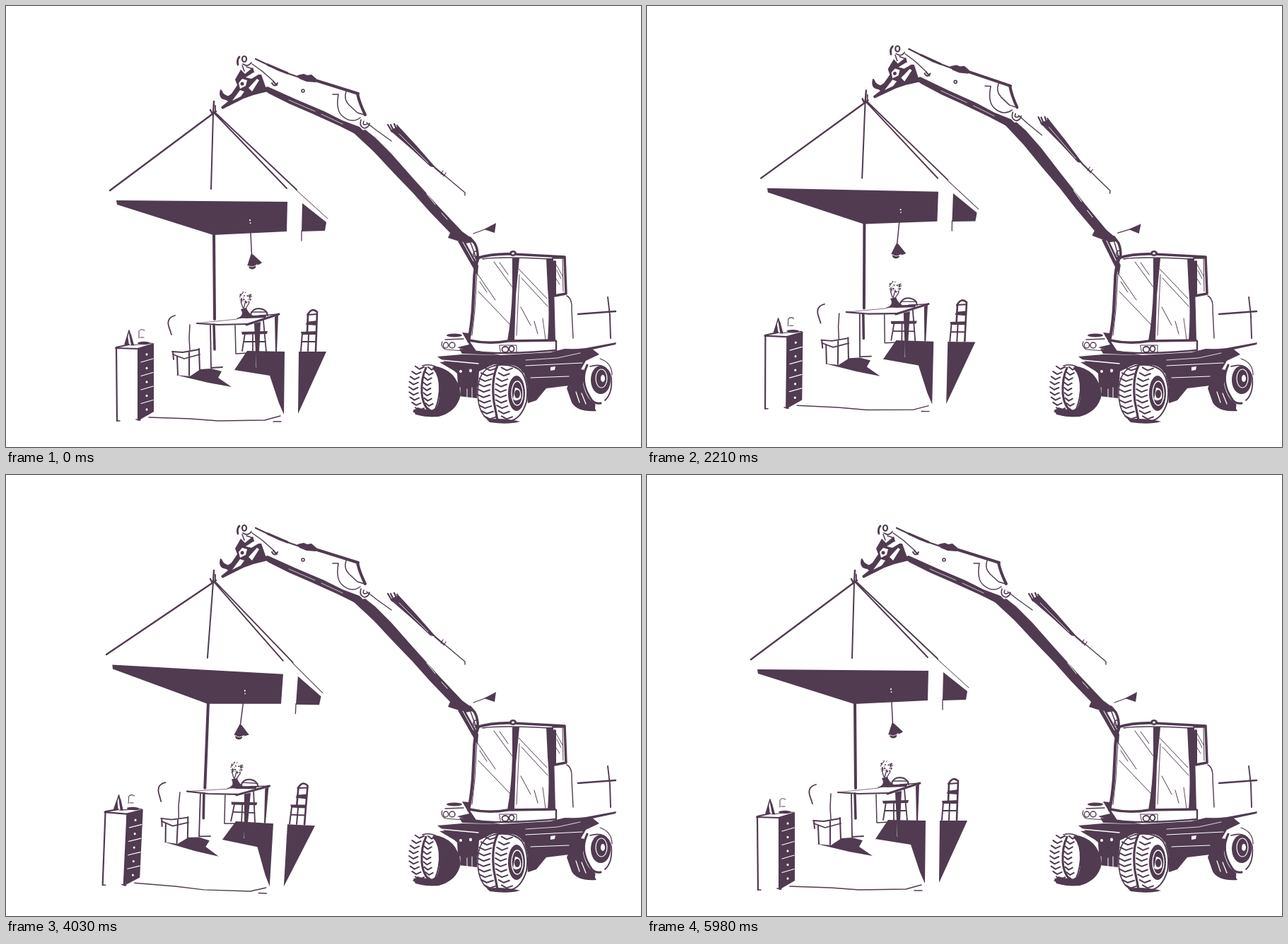
Write an HTML page with a canvas that moves like this. It is 898 px wide and 624 px high and loops after 6.11 s.

```html
<!DOCTYPE html>
<html lang="en">
<head>
<meta charset="utf-8">
<title>Crane lifting a room</title>
<style>
html, body { margin: 0; width: 100%; height: 100%; overflow: hidden; background: #fff; }
canvas { display: block; }
</style>
</head>
<body>
<canvas id="stage" width="898" height="624"></canvas>
<script>
const ctx = document.getElementById('stage').getContext('2d');
const INK = '#503b50', PAPER = '#fff';
const LOOP = 6110, STEP = 130;

// Pose keys: [time, value]
const LIFT = [[0, 0], [390, .5], [750, 1], [1350, .78], [1500, .76], [2600, .76], [2990, .3],
  [3250, -.33], [3450, -.5], [3900, -.2], [4030, 0], [LOOP, 0]];
const SWAY = [[0, 0], [300, .025], [600, .039], [780, .033], [1300, -.03], [1980, .025], [2210, .0125],
  [2600, -.006], [2990, .003], [3300, -.045], [3900, .027], [4030, .047], [4100, .05], [4450, .01],
  [4800, -.027], [5500, .013], [5850, 0], [LOOP, 0]];
const LAMP = [[0, -.05], [400, .13], [780, .09], [1200, -.1], [1600, .09], [1900, 0], [2210, .1],
  [2600, -.03], [2990, -.09], [3300, -.11], [3600, -.04], [4030, .13], [4680, 0], [4950, -.06],
  [5400, .04], [5850, -.03], [5980, -.05], [LOOP, -.05]];

// Smooth curve through the keys that rests at each extreme
function sample(keys, t) {
  const grade = i => (keys[i + 1][1] - keys[i][1]) / (keys[i + 1][0] - keys[i][0]);
  const slope = i => {
    if (i === 0 || i === keys.length - 1) return 0;
    const a = grade(i - 1), b = grade(i);
    return a * b <= 0 ? 0 : 2 * a * b / (a + b);
  };
  let i = 0;
  while (i < keys.length - 2 && t >= keys[i + 1][0]) i++;
  const [t0, v0] = keys[i], [t1, v1] = keys[i + 1], d = t1 - t0, s = (t - t0) / d;
  return v0 + (v1 - v0) * s * s * (3 - 2 * s)
    + d * s * (1 - s) * ((1 - s) * slope(i) - s * slope(i + 1));
}

function fill(d, color = INK) {
  ctx.fillStyle = color;
  ctx.fill(new Path2D(d));
}
function line(d, width = 2, color = INK) {
  ctx.strokeStyle = color;
  ctx.lineWidth = width;
  ctx.stroke(new Path2D(d));
}
function oval(x, y, rx, ry, color = INK, tilt = 0) {
  ctx.fillStyle = color;
  ctx.beginPath();
  ctx.ellipse(x, y, rx, ry, tilt, 0, 7);
  ctx.fill();
}
function ring(x, y, rx, ry, width = 2, color = INK) {
  ctx.strokeStyle = color;
  ctx.lineWidth = width;
  ctx.beginPath();
  ctx.ellipse(x, y, rx, ry, 0, 0, 7);
  ctx.stroke();
}
function turn(angle, x, y) {
  ctx.translate(x, y);
  ctx.rotate(angle);
  ctx.translate(-x, -y);
}
function group(draw) {
  ctx.save();
  draw();
  ctx.restore();
}
function spin([x, y], angle, [px, py]) {
  const c = Math.cos(angle), s = Math.sin(angle), dx = x - px, dy = y - py;
  return [px + dx * c - dy * s, py + dx * s + dy * c];
}
function random(seed) {
  return () => (seed = seed * 16807 % 2147483647) / 2147483647;
}

function drawBoom() {
  fill('M491 179L508 175L522 186L545 209L575 243L612 284L645 319L656 327L661 334L650 336L625 328L628 321L600 292L575 264L548 236L520 206Z');
  line('M595 266L607 281M616 293L624 302', 1, PAPER);
  line('M510 165L524 176L545 191', 1.3);
  fill('M639 333L648 331L668 367L667 381L662 373Z');
  line('M646 334L661 361', 1, PAPER);
  line('M656 328L663 336Q668 346 667 357', 3.5);
  line('M657 335L665 357', 1.5);
  ring(664, 351, 3, 4, 1.5);
  line('M661 322L680 315', 1.3);
  fill('M676 316L693 307L691 321Z');
}

function drawRam() {
  fill('M543 176L555 170L580 197L608 229L600 227L574 203Z');
  line('M540 168L546 178M544 168L549 178M549 167L553 176M553 169L557 176', 2.2);
  line('M556 181L597 222', .8, PAPER);
  line('M604 226L624 243L649 264V268', 1.4);
  line('M606 229L619 240M615 238L618 233M619 241L622 236', 1.2);
}

function drawStick() {
  line('M330 72Q326 76 328 83', 2.8);
  ring(337, 75, 3, 4, 2.2);
  line('M335 82Q342 87 347 80M334 84L337 92M340 86L349 89', 1.6);
  line('M353 75L370 83L386 91L415 101', 2.2);
  line('M370 83L398 95', 3);
  fill('M412 98L421 96L426 98L432 97L439 103L438 108L425 107L415 103Z');
  line('M434 104L466 114L498 124', 4);
  line('M348 82L362 92L379 107', 1.4);
  line('M376 109Q380 116 384 109M378 107L383 112', 2);
  ring(420, 120, 2, 2, 1.6);
  fill('M362 117L370 114L410 132L450 149L476 162L500 171L509 180L494 181L470 169L430 151L400 138L372 124Z');
  line('M400 133L437 149M446 153L476 167', .7, PAPER);
  line('M462 125H470Q466 148 476 156Q489 167 501 158', 1.5);
  line('M481 121Q477 132 485 140L497 151L507 154', 1.5);
  line('M497 124Q500 138 508 154', 4);
  line('M502 161Q499 171 507 173Q513 172 514 166M506 163Q503 170 511 167', 1.6);

  fill('M324 104L332 90L338 96L349 87L352 97L361 97L367 114L370 121L350 126L336 131L318 140L306 146L304 143L314 135L309 131L319 124L327 112Z');
  fill('M303 118Q299 133 313 133L322 127Q309 130 305 119Z');
  fill('M329 109L334 103L341 105L339 113L331 117Z', PAPER);
  oval(334, 110, 2.5, 2.5);
  fill('M339 101L350 94L357 97L347 103Z', PAPER);
  fill('M320 134L331 119L337 121L332 128Z', PAPER);
  fill('M343 116L355 103L358 105L348 121Z', PAPER);
}

function drawHook() {
  line('M294 135L293 152M289 147L292 153L297 149', 2.4);
  line('M296 141V151', 1.8);
}

function drawDrawers() {
  line('M156 483L157 587M155 484L186 485M156 483L174 479', 2.2);
  line('M188 486V585', 4);
  fill('M186 484L209 477V574L190 585Z');
  for (let i = 0; i < 5; i++) {
    const y = 501 + i * 19.5;
    if (i < 4) line(`M191 ${y + 3}L208 ${y - 2}`, 1.2, PAPER);
    oval(199, y - 8, 1.5, 1.7, PAPER);
  }
  line('M168 479L174 459M174 459L180 480', 1.5);
  fill('M168 480L172 465L174 480Z');
  fill('M173 459L177 465L181 480H177Z');
  line('M188 470V460Q191 456 196 459M190 469H195', 1);
  oval(195, 477, 9, 2.2);
  line('M176 480L207 477', 1.2);
}

function drawChairs() {
  line('M239 438Q227 441 230 453L234 465', 1.8);
  line('M260 451L259 470L260 487', 1.5);
  line('M235 489L250 490L273 486M236 493L252 499L274 493', 1.8);
  line('M242 496L243 522M236 489L237 500M273 485L274 517M259 490V523', 2);
  fill('M260 524L275 514L290 513L305 517L300 526L319 539L286 533L240 522Z');

  line('M426 462L427 436Q433 426 440 433L438 488', 2.6);
  line('M426 437L440 436M425 450L439 450', 2);
  fill('M425 447L440 445L439 452L425 451Z');
  fill('M417 461L440 460L439 465L418 465Z');
  line('M419 463L417 488M428 464L427 488M418 475H438', 2);

  line('M346 437Q348 428 358 428Q369 429 370 438', 2);
  line('M347 433H369', 1.3);
  fill('M333 461L370 460L369 464L334 465Z');
  line('M338 463L334 488M349 463V488M364 445L368 489M336 475H367', 1.8);
}

function drawTable() {
  line('M270 449L300 451L342 450', 2.2);
  line('M270 449L327 443', .7);
  line('M340 451L386 436', 3);
  line('M327 442L340 440M358 438L386 436', 1.3);
  line('M289 452L290 512L306 511', 1.8);
  line('M324 452L325 492L343 491', 1.5);
  fill('M351 449L360 447L357 511H354Z');
  fill('M380 440L385 437L383 489H381Z');
  fill('M329 441Q337 437 332 429L340 427Q342 434 349 438L369 437L367 441L340 442Z');
  const rnd = random(71);
  for (let i = 0; i < 42; i++) {
    const a = rnd() * 6.3, r = Math.sqrt(rnd()) * 9, size = .5 + rnd() * .9;
    oval(339 + Math.cos(a) * r, 412 + Math.sin(a) * r * .95, size, size * .8);
  }
  line('M336 428L339 417M339 428L344 420M335 427L332 418', 1.3);
}

function drawLamp() {
  line('M345 320V353', 1.5);
  fill('M344 351L347 352L359 364Q351 369 338 367Z');
  oval(345, 369, 5, 3.5);
  line('M341 368Q346 371 352 366', .8, PAPER);
}

function drawRoom(lampAngle) {
  line('M293 152L147 261', 2.4);
  line('M293 152L290 259', 2);
  line('M294 151L397 258M297 152L411 260', 1.9);
  line('M411 261L455 301', 1);
  fill('M156 275L398 277L397 319L293 324L157 281Z');
  fill('M419 279L453 306L451 318L418 319Z');
  line('M418 318V332', 1.3);
  oval(345, 303, 1, 1.2, PAPER);
  oval(345.5, 307, .9, .9, PAPER);
  line('M294 323L295 443', 4);
  line('M294 451L295 486', 3.5);
  fill('M341 488L394 489L393 578L386 562L373 523L323 515Z');
  fill('M414 489L453 489L413 577Z');
  line('M354 489V511', 1, PAPER);
  drawChairs();
  drawTable();
  drawDrawers();
  line('M202 582L260 584L300 587L366 586L388 580M378 588H389', 1.4);
  line('M157 587H161M184 585L190 586', 1.5);
  group(() => {
    turn(lampAngle, 345, 302);
    drawLamp();
  });
}

// Rows of chevrons down one face of a tyre
function tread(x, y, rx, ry, width, rows) {
  for (let i = 0; i < rows; i++) {
    const k = -.86 + 1.72 * i / (rows - 1), left = x - rx * Math.sqrt(1 - k * k), top = y + ry * k;
    line(`M${left} ${top - 2}l${width * .45} 4l${width * .5} -3`, 2);
  }
}

function drawWheels() {
  // rear left pair
  fill('M604 509Q639 514 643 550Q638 574 612 581Q588 583 575 574L582 568L602 574Q617 545 604 509Z');
  fill('M590 511Q612 506 613 541Q614 571 600 576Q585 572 586 541Z', PAPER);
  line('M594 512Q587 526 588 548Q590 568 602 575', 3);
  line('M604 512Q614 523 613 544Q611 566 604 575', 2);
  line('M589 509Q598 506 607 510', 1.6);
  tread(588, 541, 18, 34, 13, 9);
  tread(604, 542, 14, 34, 11, 9);
  fill('M576 571Q600 568 623 577Q602 585 579 578Z');

  // far right
  fill('M804 515Q838 507 833 570L835 573Q808 575 800 561L793 541Z');
  fill('M820 507Q850 496 857 528Q858 557 838 566Q821 559 816 535Z', PAPER);
  line('M822 508Q811 530 826 554Q831 564 841 562', 3);
  line('M826 510Q850 503 856 526Q858 548 847 558', 1.8);
  oval(841, 529, 14, 20);
  ring(842, 527, 8, 13, 1.2, PAPER);
  oval(844, 527, 3, 5, PAPER);
  line('M840 499Q857 505 857 522', 1.2);
  line('M806 546L811 561M814 548L820 563', 1.3, PAPER);

  // front
  fill('M690 508Q667 512 666 548Q667 582 686 587L716 588Q738 580 738 545Q736 510 714 508Z', PAPER);
  tread(686, 548, 19, 40, 18, 10);
  tread(710, 548, 18, 40, 16, 10);
  line('M691 509Q667 514 667 548Q668 580 686 587', 1.6);
  line('M695 509Q686 528 690 560L695 586', 3.2);
  line('M690 509Q718 504 730 519Q740 536 736 560Q729 583 714 587', 2);
  oval(722, 548, 12, 25);
  ring(723, 548, 8, 17, 1.4, PAPER);
  fill('M720 540Q730 541 728 555Q722 561 717 556Z', PAPER);
  oval(723, 549, 4, 6);
  fill('M680 585Q702 582 727 588Q710 593 684 589Z');
}

function drawChassis() {
  fill('M610 496L645 493L700 494L770 490L790 485L830 486L839 493L820 502L808 523L797 537L764 541L750 558L738 562L733 520L715 508L690 507L669 517L666 555L640 552L638 520L622 505Z');
  fill('M613 504L650 501L664 510L640 520Z');
  line('M614 501L668 506', 1.4, PAPER);
  line('M735 509L815 505M742 526L796 524', 1.2, PAPER);
  line('M735 501L780 498L812 491', .8, PAPER);
  fill('M770 511L777 510L776 515L770 516Z', PAPER);
  oval(643, 517, 2, 2, PAPER);
  oval(657, 516, 2, 2.4, PAPER);
  line('M642 540V552M652 542V554M659 540V554', 1, PAPER);
}

function drawCab() {
  line('M665 357Q688 350 716 351L790 355', 3.6);
  line('M674 358Q700 354 770 358', 1.6);
  oval(717, 350, 5, 4);
  oval(717, 350, 2, 1.5, PAPER);
  line('M668 356Q662 372 662 390L660 430Q658 456 654 474', 4.2);
  line('M666 378L663 430L659 466', 1);
  fill('M716 357L726 357L721 410L719 473L709 474Q715 440 716 400Z');
  fill('M764 357L774 357L777 474L766 474Q769 430 766 400Z');
  line('M655 473Q682 479 710 474L776 473', 3.6);
  line('M656 477L664 489Q700 494 778 487V474', 2.4);
  line('M774 356L790 356L792 407L776 410', 3.5);
  line('M787 358L788 404', 1);
  line('M776 362V408', 4);
  line('M778 366L787 382M779 374L785 386M778 386L783 394', .9);
  line('M666 378L692 416M690 362L717 399M668 404L714 452M670 390L680 405M698 363L710 380', 1);
  line('M725 372L765 414M729 385L766 425M728 426L742 452M747 446L752 464', 1);
  line('M759 442L763 472M726 380L722 466', .9);
  line('M793 410Q801 414 800 430L802 470', 1.4);
  line('M809 436L862 432', 2.4);
  line('M851 412L854 438L855 470', 1.9);
  fill('M778 488L820 484L863 476L862 479L820 488L790 490Z');
  line('M698 480H722V491H700Z', 1);
  ring(706, 486, 4.5, 4, 1.8);
  ring(715, 485, 3.5, 4, 1.8);
  oval(634, 466, 11, 2.5);
  line('M621 472L647 471', 1.3);
  ring(622, 480, 3.5, 4, 1.3);
  ring(631, 480, 4, 4, 1.5);
  line('M617 475Q614 481 621 486L660 489', 1.2);
  fill('M645 462L655 463L657 478L664 489L650 487L638 483L655 479Z');
  fill('M641 485L668 488L700 494L645 492Z');
}

function drawScene(t) {
  const lift = sample(LIFT, t), sway = sample(SWAY, t), lamp = sample(LAMP, t);
  const pivot = [677, 393], hinge = [506, 167];
  const moved = spin(hinge, .086 * lift, pivot);
  const placeStick = () => {
    ctx.translate(moved[0] - hinge[0], moved[1] - hinge[1]);
    turn(.03 * lift, ...hinge);
  };

  ctx.fillStyle = PAPER;
  ctx.fillRect(0, 0, 898, 624);
  ctx.lineCap = ctx.lineJoin = 'round';

  group(() => {
    turn(.086 * lift, ...pivot);
    drawBoom();
  });
  group(() => {
    turn(.1 * lift, 688, 340);
    drawRam();
  });
  group(() => {
    placeStick();
    drawStick();
    drawHook();
  });
  group(() => {
    placeStick();
    turn(sway - .03 * lift, 293, 151);
    drawRoom(lamp - sway);
  });
  drawChassis();
  drawWheels();
  drawCab();
}

let shown = -1;
function tick() {
  const step = Math.floor(performance.now() % LOOP / STEP);
  if (step !== shown) {
    shown = step;
    drawScene(step * STEP);
  }
  requestAnimationFrame(tick);
}
tick();
</script>
</body>
</html>
```
